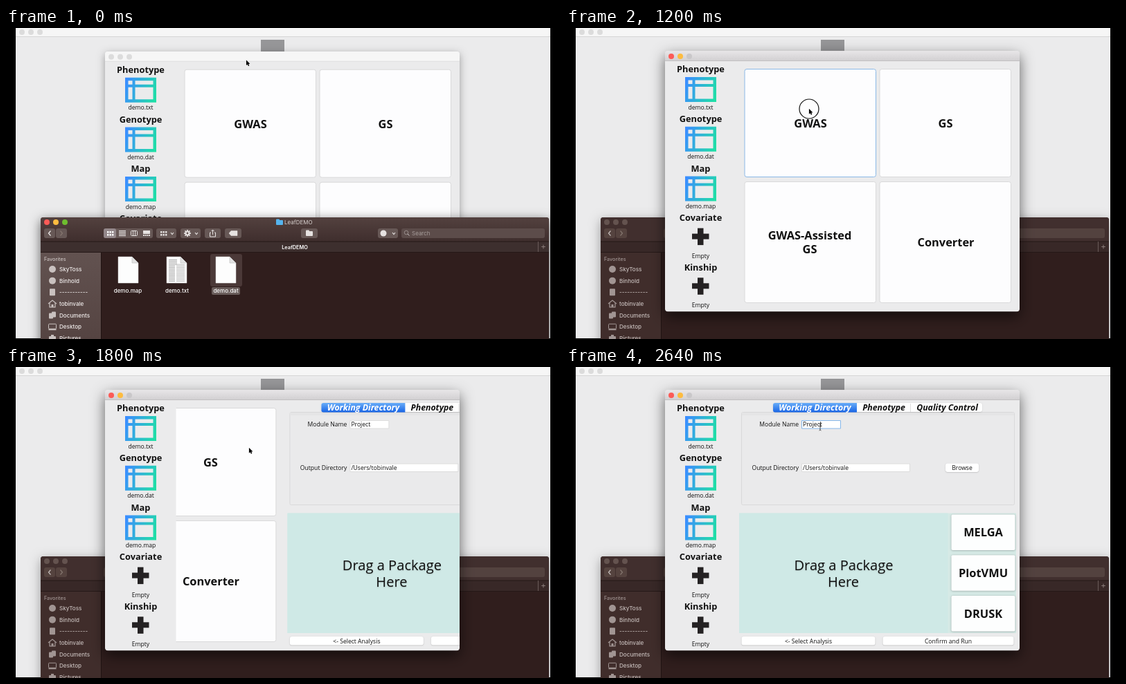
An HTML page with a canvas that plays this animation: 800x450 px, repeating every 2680 ms.

```html
<!DOCTYPE html>
<html lang="en">
<head>
<meta charset="utf-8">
<title>Analysis setup</title>
<style>
html, body { margin: 0; width: 100%; height: 100%; overflow: hidden; background: #000; }
canvas { display: block; }
</style>
</head>
<body>
<canvas id="stage" width="800" height="450"></canvas>
<script>
const ctx = document.getElementById('stage').getContext('2d');
const LOOP = 2680, RAISE = 180, SLIDE = 1348, SLIDE_TIME = 805, TRAVEL = 409, FOCUS = 2520;
const JAVA = '"Open Sans", "Noto Sans", sans-serif', MAC = 'Inter, sans-serif';
const USER = 'tobinvale', FOLDER = 'LeafDEMO';

// Pointer path: time, x, y
const PATH = [[0, 347, 46.5], [200, 346, 42], [640, 346, 42], [1040, 351, 117],
  [2040, 351, 117], [2200, 370, 103.5], [2400, 367, 87], [LOOP, 367, 87]];

function rect(x, y, w, h, fill, radius = 0, stroke) {
  ctx.beginPath();
  ctx.roundRect(x, y, w, h, radius);
  if (fill) { ctx.fillStyle = fill; ctx.fill(); }
  if (stroke) { ctx.strokeStyle = stroke; ctx.lineWidth = 1; ctx.stroke(); }
}

function disc(x, y, r, fill) {
  ctx.beginPath();
  ctx.arc(x, y, r, 0, 7);
  ctx.fillStyle = fill;
  ctx.fill();
}

function line(points, color, width = 1, closed, fill) {
  ctx.beginPath();
  points.forEach(([x, y]) => ctx.lineTo(x, y));
  if (closed) ctx.closePath();
  if (fill) { ctx.fillStyle = fill; ctx.fill(); }
  ctx.strokeStyle = color;
  ctx.lineWidth = width;
  ctx.stroke();
}

// y is the middle of the capitals
function text(str, x, y, size, { color = '#111', align = 'center', style = '', font = JAVA } = {}) {
  ctx.font = `${style} ${size}px ${font}`;
  ctx.textAlign = align;
  ctx.fillStyle = color;
  ctx.fillText(str, x, y + size * 0.36);
}

function gradient(x0, y0, x1, y1, a, b) {
  const g = ctx.createLinearGradient(x0, y0, x1, y1);
  g.addColorStop(0, a);
  g.addColorStop(1, b);
  return g;
}

function shadowed(alpha, blur, dy, draw) {
  ctx.save();
  ctx.shadowColor = `rgba(0,0,0,${alpha})`;
  ctx.shadowBlur = blur;
  ctx.shadowOffsetY = dy;
  draw();
  ctx.restore();
}

function lights(x, y, colors) {
  colors.forEach((c, i) => disc(x + 13 * i, y, 4, c));
}

function drawBackdrop() {
  rect(0, 0, 800, 450, '#000');
  rect(14, 0, 772, 449, '#ebebec');
  rect(14, 0, 772, 12, '#f6f6f6');
  rect(14, 12, 772, 1, '#d6d6d6');
  lights(23, 6, Array(3).fill('#dcdcdc'));
  rect(368, 17, 34, 34, '#969698');
}

function sidebarIcon(i, y, color) {
  const x = 67;
  if (i < 2) disc(x, y, 5, color);
  else if (i === 2) rect(x - 4, y - 5, 8, 10, color, 1);
  else if (i === 3) {
    line([[x - 6, y], [x, y - 5], [x + 6, y]], color, 1.2);
    line([[x - 4, y - 1], [x - 4, y + 5], [x + 4, y + 5], [x + 4, y - 1]], color, 1.2);
    rect(x - 1.5, y + 1, 3, 4, color);
  } else if (i === 4) {
    rect(x - 5, y - 3, 6, 8, color, 1);
    rect(x - 1, y - 5, 6, 8, color, 1);
  } else if (i === 5) {
    rect(x - 5.5, y - 4, 11, 7, null, 1, color);
    rect(x - 5.5, y + 3, 11, 2, color);
  } else {
    rect(x - 5, y - 3, 10, 8, color, 1);
    rect(x - 2, y - 5, 4, 3, color);
  }
}

function documentIcon(x, y, lined) {
  line([[x, y], [x + 20, y], [x + 29, y + 9], [x + 29, y + 38], [x, y + 38]], '#ddd', 0.5, true, '#fdfdfd');
  if (lined) for (let i = 0; i < 15; i++) {
    const row = y + 4 + i * 2.2;
    rect(x + 3, row, i < 4 ? 12 : 9, 1, '#a5a5a5');
    if (i > 2) rect(x + 14, row, 12, 1, '#b8b8b8');
  }
  line([[x + 20, y], [x + 20, y + 9], [x + 29, y + 9]], '#bbb', 0.6, true, '#e2e2e2');
}

function chevron(x, y, color) {
  line([[x - 2, y - 1], [x, y + 1.5], [x + 2, y - 1]], color, 1.2);
}

function drawToolbar() {
  const button = '#675856', ink = '#e6e2e1';
  [[141, 71], [217, 29], [252, 29], [287, 23], [316, 24], [426, 24], [537, 29]]
    .forEach(([x, w]) => rect(x, 290, w, 14, button, 3));
  rect(141, 290, 18, 14, '#93878a', 3);
  for (let i = 0; i < 6; i++) {
    const x = 146 + i % 3 * 3.5, y = 294 + (i > 2) * 4;
    rect(x, y, 2.4, 2.6, '#fff');
    rect(x + 77, y, 2.4, 2.6, ink);
  }
  for (let i = 0; i < 4; i++) rect(163, 293 + i * 2.3, 10, 1.2, ink);
  rect(180.5, 293.5, 9, 7, null, 1, ink);
  line([[183.5, 293.5], [183.5, 300.5]], ink);
  line([[186.5, 293.5], [186.5, 300.5]], ink);
  rect(198, 293, 10, 5, ink);
  for (let i = 0; i < 4; i++) rect(198 + i * 2.7, 299, 1.9, 2, ink);
  for (let i = 0; i < 4; i++) {
    const c = Math.cos(i * Math.PI / 4) * 5, s = Math.sin(i * Math.PI / 4) * 5;
    line([[262 - c, 297 - s], [262 + c, 297 + s]], ink, 1.8);
  }
  disc(262, 297, 3.5, ink);
  disc(262, 297, 1.4, button);
  [240, 275, 560].forEach(x => chevron(x, 297, ink));
  line([[296, 296], [294.5, 296], [294.5, 302], [302.5, 302], [302.5, 296], [301, 296]], ink);
  line([[298.5, 299], [298.5, 292.5]], ink);
  line([[296.5, 294], [298.5, 292], [300.5, 294]], ink);
  line([[322, 297], [325, 293.5], [334, 293.5], [334, 300.5], [325, 300.5]], ink, 0.5, true, ink);
  rect(433, 294, 10, 7, ink, 1);
  rect(433, 292.5, 5, 3, ink, 1);
  disc(545, 297, 4.5, ink);
  ctx.beginPath();
  ctx.arc(578, 296, 2.8, 0, 7);
  ctx.strokeStyle = '#ccc5c4';
  ctx.stroke();
  line([[580, 298], [582.5, 300.5]], '#ccc5c4');
  text('Search', 586, 297, 8, { color: '#a79d9b', align: 'left', font: MAC });
  rect(390, 278, 10, 7, '#55b4ee', 1);
  rect(390, 276.5, 5, 3, '#55b4ee', 1);
  text(FOLDER, 402, 281, 8, { color: '#d8d2d0', align: 'left', font: MAC });
  text(FOLDER, 417, 317, 7.3, { color: '#fff', style: '600', font: MAC });
}

function drawFiles() {
  rect(295, 327, 46, 47, '#4b3938', 3);
  rect(297, 375, 41, 11, '#6a5d5b', 2);
  ['demo.map', 'demo.txt', 'demo.dat'].forEach((name, i) => {
    documentIcon([162, 232, 303][i], 331, i === 1);
    text(name, [176, 247, 317.5][i], 380, 8, { color: '#fff', style: '500', font: MAC });
  });
}

function drawFinder(active) {
  const ink = active ? '#f0eceb' : '#c4bbb9', icon = active ? '#c9c1bf' : '#a19593';
  shadowed(active ? 0.6 : 0.35, 16, 4, () => rect(50, 274, 734, 190, '#301e1d', 4));
  rect(50, 274, 734, 35, active ? gradient(0, 274, 0, 309, '#53413f', '#3f2e2d') : '#412f2e', [4, 4, 0, 0]);
  rect(50, 309, 734, 16, active ? '#3d2f2e' : '#382827');
  rect(50, 308.5, 734, 1, '#251817');
  rect(50, 324, 734, 1, '#251817');
  rect(768, 309, 1, 15, '#6a5b59');
  text('+', 776, 316, 12, { color: '#8e807e', font: MAC });
  rect(50, 325, 87, 125, active ? gradient(0, 325, 0, 450, '#625250', '#554442') : '#402d2b');
  rect(137, 325, 1, 125, '#201312');
  lights(59, 281, active ? ['#fc5b57', '#fdbc40', '#6ebd2f'] : Array(3).fill('#64534f'));
  const button = active ? '#675856' : '#55433f';
  rect(55, 290, 16, 14, button, 3);
  rect(72, 290, 16, 14, button, 3);
  line([[64.5, 293.5], [61.5, 297], [64.5, 300.5]], ink, 1.2);
  line([[78.5, 293.5], [81.5, 297], [78.5, 300.5]], '#85766f', 1.2);
  rect(571, 290, 207, 14, active ? '#5c4c4a' : '#53423f', 3);
  if (active) drawToolbar();
  else rect(141, 290, 71, 14, button, 3);
  text('Favorites', 55, 334, 7.2, { color: icon, align: 'left', style: '500', font: MAC });
  ['SkyToss', 'Binhold', '-----------', USER, 'Documents', 'Desktop', 'Pictures'].forEach((label, i) => {
    const y = 349 + i * 16.65;
    sidebarIcon(i, y, icon);
    text(label, 77, y, 8.1, { color: ink, align: 'left', style: '500', font: MAC });
  });
  if (active) drawFiles();
}

function tableIcon(x, y) {
  ctx.fillStyle = gradient(x, y + 10, x + 45, y + 26, '#3b8eff', '#1fdfa6');
  ctx.beginPath();
  ctx.rect(x, y, 45, 36);
  [[4.5, 4.5, 6, 5.5], [14.5, 4.5, 26, 5.5], [4.5, 14, 6, 17.5], [14.5, 14, 26, 17.5]]
    .forEach(([dx, dy, w, h]) => ctx.rect(x + dx, y + dy, w, h));
  ctx.fill('evenodd');
}

function drawInputs() {
  ['Phenotype', 'Genotype', 'Map', 'Covariate', 'Kinship'].forEach((label, i) => {
    const y = 59.5 + i * 71.7;
    text(label, 194.5, y, 12.8, { style: 'bold' });
    if (i < 3) tableIcon(172, y + 11.5);
    else {
      rect(182, y + 23, 24.5, 8, '#252223');
      rect(190, y + 15, 8.5, 24.5, '#252223');
    }
    text(['demo.txt', 'demo.dat', 'demo.map'][i] || 'Empty', 194.5, y + 55, 8.6);
  });
}

function drawChoices(focused) {
  const bold = { style: 'bold' };
  [[258, 59.5, 156], [453, 59.5, 156], [258, 222.5, 175], [453, 222.5, 175]].forEach(([x, y, h], i) =>
    rect(x, y, 189.5, h, '#fdfdfe', 3, focused && !i ? '#8ab8e6' : '#d9d9da'));
  text('GWAS', 353, 138, 16.4, bold);
  text('GS', 548, 138, 16.4, bold);
  text('GWAS-Assisted', 352, 300, 16.4, bold);
  text('GS', 352, 320, 16.4, bold);
  text('Converter', 548.5, 310, 16.4, bold);
}

function pushButton(x, y, w, label) {
  shadowed(0.25, 1.5, 0.6, () => rect(x, y, w, 12.5, '#fff', 3));
  text(label, x + w / 2, y + 6.5, 8.6);
}

function drawSettings(focused) {
  rect(253.5, 65.5, 394, 134, '#eaeaeb', 2, '#d9d9da');
  rect(254, 66, 393, 4, '#e5e5e6');
  shadowed(0.2, 1.5, 0.5, () => rect(299, 52, 302, 13, '#fdfdfd', 3));
  rect(299, 52, 121, 13.5, gradient(0, 52, 0, 65, '#69adf8', '#1b67e6'), [3, 0, 0, 3]);
  rect(497, 53, 1, 12, '#ddd');
  const tab = { style: 'italic bold' };
  text('Working Directory', 359.5, 59, 12.3, { ...tab, color: '#fff' });
  text('Phenotype', 459, 59, 12.3, tab);
  text('Quality Control', 550.5, 59, 12.3, tab);

  text('Module Name', 336, 83, 8.6, { align: 'right' });
  rect(340.5, 77.5, 56, 11.5, '#fff', 0, focused ? '#85b7ea' : '#dcdcdc');
  text('Project', 342, 83, 8.6, { align: 'left' });
  text('Output Directory', 336, 146, 8.6, { align: 'right' });
  rect(340.5, 140, 156, 11.5, '#fff', 0, '#dcdcdc');
  text('/Users/' + USER, 342, 146, 8.6, { align: 'left' });
  pushButton(548, 139.5, 48, 'Browse');

  rect(250, 211.5, 400, 173.5, '#d6eae6');
  rect(250, 211.5, 301.5, 173.5, '#cfe9e6');
  shadowed(0.2, 1.5, 1, () => {
    text('Drag a Package', 401, 287, 20.1);
    text('Here', 400.5, 310.5, 20.1);
  });
  ['MELGA', 'PlotVMU', 'DRUSK'].forEach((name, i) => {
    const y = 213.5 + i * 58.8;
    shadowed(0.3, 3, 0.5, () => rect(556.5, y, 92, 51.5, '#fdfefe', 2));
    text(name, 602.5, y + 26, 16.4, { style: 'bold' });
  });
  pushButton(253.5, 390, 193, '<- Select Analysis');
  pushButton(457.5, 390, 189, 'Confirm and Run');
}

function slideOffset(t) {
  const u = Math.min(1, Math.max(0, (t - SLIDE) / SLIDE_TIME));
  return TRAVEL * (u < 0.5 ? 2 * u * u : 1 - 2 * (1 - u) ** 2);
}

function drawModule(t, active) {
  const offset = slideOffset(t);
  ctx.save();
  if (!active) ctx.translate(0, 0.7);
  shadowed(active ? 0.6 : 0.35, active ? 20 : 12, active ? 7 : 3, () => rect(143, 33.3, 512, 377, '#ebebec', 4));
  rect(143, 33.3, 512, 14.2, active ? gradient(0, 33, 0, 47, '#e8e6e8', '#d2d0d2') : '#f6f6f6', [4, 4, 0, 0]);
  rect(143, 47, 512, 0.8, active ? '#b9b7b9' : '#d8d8d8');
  lights(152, 41, active ? ['#fc5b57', '#fdbc40', '#c9c7c9'] : Array(3).fill('#dcdcdc'));
  drawInputs();
  ctx.beginPath();
  ctx.rect(245.5, 48, 409.5, 362);
  ctx.clip();
  ctx.translate(-offset, 0);
  if (offset < TRAVEL) drawChoices(active);
  ctx.translate(TRAVEL, 0);
  if (offset > 0) drawSettings(t >= FOCUS);
  ctx.restore();
}

function pointerAt(t) {
  const i = PATH.findIndex(p => p[0] > t), a = PATH[i - 1], b = PATH[i];
  const u = (t - a[0]) / (b[0] - a[0]), k = u * u * (3 - 2 * u);
  return [a[1] + (b[1] - a[1]) * k, a[2] + (b[2] - a[2]) * k];
}

function drawPointer(t) {
  const [x, y] = pointerAt(t);
  if (t >= 1140 && t < 1300) {
    ctx.beginPath();
    ctx.arc(351, 117, 14, 0, 7);
    ctx.strokeStyle = '#111';
    ctx.lineWidth = 1.2;
    ctx.stroke();
  }
  if (t > 2200 && y < 90) {
    line([[x, y - 4], [x, y + 4]], '#222', 0.8);
    line([[x - 1.5, y - 5], [x, y - 4], [x + 1.5, y - 5]], '#222', 0.7);
    line([[x - 1.5, y + 5], [x, y + 4], [x + 1.5, y + 5]], '#222', 0.7);
    if (t >= FOCUS) line([[367.5, 79], [367.5, 87]], '#333', 0.8);
    return;
  }
  const arrow = [[0, 0], [0, 7.4], [1.7, 5.9], [2.9, 8.6], [4.2, 8], [3.1, 5.4], [5.2, 5.2]]
    .map(([dx, dy]) => [x + dx, y + dy]);
  line(arrow, '#fff', 1.2, true);
  line(arrow, '#000', 0.2, true, '#000');
}

function frame() {
  const t = performance.now() % LOOP, raised = t >= RAISE;
  drawBackdrop();
  if (raised) drawFinder(false);
  drawModule(t, raised);
  if (!raised) drawFinder(true);
  drawPointer(t);
  requestAnimationFrame(frame);
}
frame();
</script>
</body>
</html>
```
